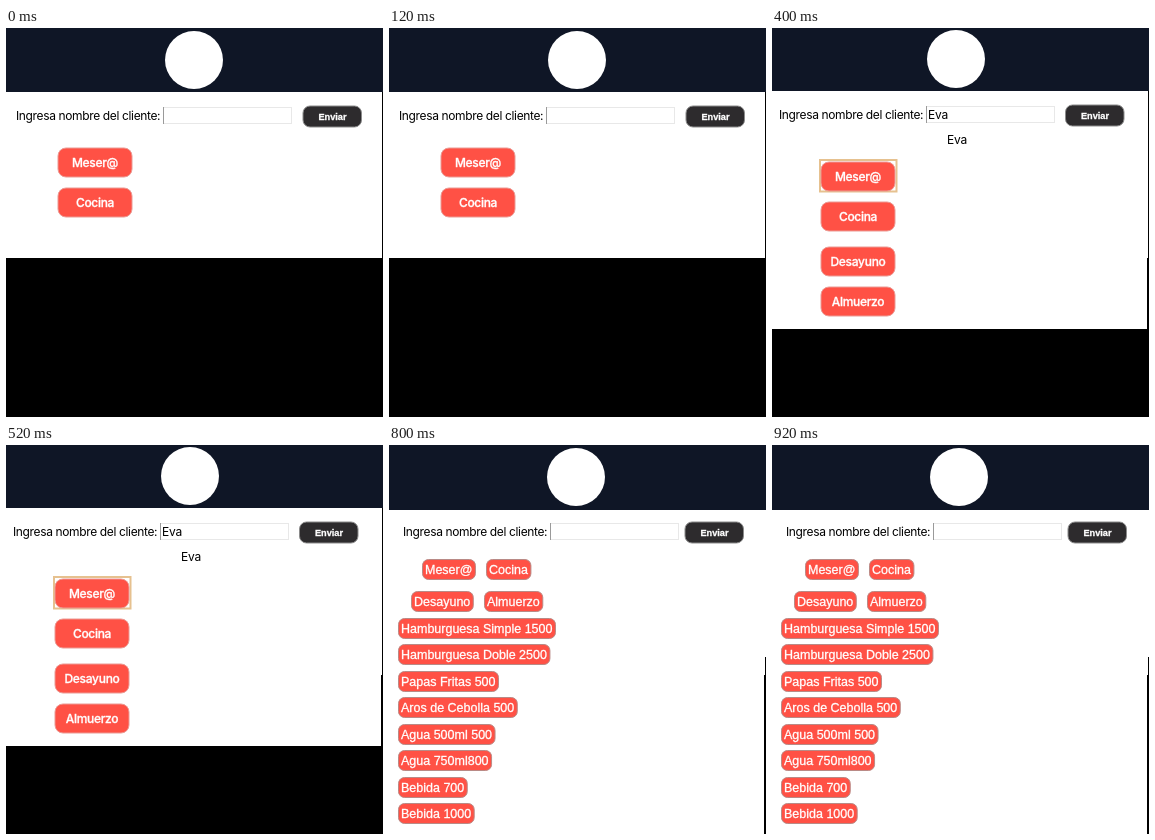
An HTML page with a canvas that plays this animation: 377 by 389 pixels, repeating every 1000 ms.

```html
<!DOCTYPE html>
<html lang="es">
<head>
<meta charset="utf-8">
<title>Pedidos</title>
<style>
html, body { margin: 0; width: 100%; height: 100%; overflow: hidden; background: #000; }
canvas { display: block; }
</style>
</head>
<body>
<canvas id="stage" width="377" height="389"></canvas>
<script>
const ctx = document.getElementById('stage').getContext('2d');
const SANS = 'Inter, sans-serif';
const ARIAL = '"Liberation Sans", Arial, sans-serif';
const RED = '#ff5145';
const CLIENT = 'Eva';
const STEP = 200;

function rect(x, y, w, h, color) {
  ctx.fillStyle = color;
  ctx.fillRect(x, y, w, h);
}

function text(str, x, y, font, color, align = 'left', spacing = 0) {
  ctx.font = font;
  ctx.fillStyle = color;
  ctx.textAlign = align;
  ctx.letterSpacing = spacing + 'px';
  ctx.fillText(str, x, y);
  // Light text on colour is rendered slightly heavier.
  if (color === '#fff') {
    ctx.strokeStyle = color;
    ctx.lineWidth = 0.3;
    ctx.strokeText(str, x, y);
  }
  ctx.letterSpacing = '0px';
}

function pill(x, y, w, h, r, fill, line) {
  ctx.beginPath();
  ctx.roundRect(x + 0.5, y + 0.5, w - 1, h - 1, r);
  ctx.fillStyle = fill;
  ctx.fill();
  ctx.strokeStyle = line;
  ctx.lineWidth = 1;
  ctx.stroke();
}

function ring(x, y, w, h, color, width) {
  ctx.strokeStyle = color;
  ctx.lineWidth = width;
  ctx.strokeRect(x + width / 2, y + width / 2, w - width, h - width);
}

function bigButton(label, x, y) {
  pill(x, y, 75, 30, 8, RED, '#eb9a94');
  text(label, x + 37.5, y + 19.5, '500 12px ' + SANS, '#fff', 'center', -0.3);
}

function smallButton(label, x, y) {
  ctx.font = '12.5px ' + ARIAL;
  pill(x, y, ctx.measureText(label).width + 6.5, 21, 6, RED, '#b98a86');
  text(label, x + 3, y + 14.5, '12.5px ' + ARIAL, '#fff');
}

function header(bottom, logoX, logoY) {
  rect(0, 0, 377, bottom, '#0f1626');
  ctx.fillStyle = '#fff';
  ctx.beginPath();
  ctx.arc(logoX, logoY, 29, 0, Math.PI * 2);
  ctx.fill();
}

function form(x, y, sendX, value) {
  text('Ingresa nombre del cliente:', x, y, '12px ' + SANS, '#000', 'left', -0.36);
  const left = x + 147, top = y - 13;
  ring(left, top, 129, 17, '#e8e8e8', 1);
  rect(left, top, 1, 17, '#9a9a9a');
  if (value) text(value, left + 2, y, '12px ' + SANS, '#000', 'left', -0.2);
  pill(sendX, y - 14.5, 59.5, 22, 7, '#2d2b2d', '#8b8b8b');
  text('Enviar', sendX + 30, y, 'bold 9.2px ' + ARIAL, '#fff', 'center');
}

function clientName(x, y) {
  text(CLIENT, x, y, '12px ' + SANS, '#000', 'center', -0.2);
}

function roles(x, y) {
  bigButton('Meser@', x, y);
  bigButton('Cocina', x, y + 40);
}

function meals(x, y) {
  bigButton('Desayuno', x, y);
  bigButton('Almuerzo', x, y + 40);
}

function compactMenu(x, y) {
  smallButton('Meser@', x + 11, y);
  smallButton('Cocina', x + 75, y);
  smallButton('Desayuno', x, y + 32);
  smallButton('Almuerzo', x + 73, y + 32);
}

const dishes = [
  'Hamburguesa Simple 1500', 'Hamburguesa Doble 2500', 'Papas Fritas 500',
  'Aros de Cebolla 500', 'Agua 500ml 500', 'Agua 750ml800',
  'Bebida 700', 'Bebida 1000'
];

// The page grows in height; its right edge is slightly stepped.
function page(height, fullTop) {
  rect(0, 0, 377, 389, '#000');
  rect(0, 0, 375, height, '#fff');
  rect(375, 0, 1, 230, '#fff');
  if (fullTop) rect(376, 0, 1, 212, '#fff');
}

const screens = [
  () => {
    page(230);
    header(64, 188, 32);
    form(10, 92, 296.5, '');
    roles(51.5, 119.5);
  },
  () => {
    page(248);
    header(64, 186, 32);
    ring(293, 75, 64, 26.5, '#f3bd83', 2);
    form(9, 92, 295, CLIENT);
    clientName(187, 117);
    roles(50.5, 134.5);
  },
  () => {
    page(301);
    header(63, 184, 31);
    form(7, 91, 293, CLIENT);
    clientName(185, 116);
    ring(47, 131, 78.5, 33.5, '#e6c18f', 2);
    roles(48.5, 133.5);
    meals(48.5, 218.5);
  },
  () => {
    page(301, true);
    header(64, 189, 32);
    form(17, 90, 298.5, '');
    ring(34, 111, 58, 26, '#ecdcc6', 1);
    compactMenu(25, 113);
    meals(48.5, 218.5);
  },
  () => {
    page(389, true);
    header(65, 187, 32);
    form(14, 91, 295.5, '');
    compactMenu(22, 114);
    dishes.forEach((dish, i) => smallButton(dish, 9, Math.round(172.6 + i * 26.5)));
  }
];

let start = null;
function tick(now) {
  if (start === null) start = now;
  screens[Math.floor((now - start) / STEP) % screens.length]();
  requestAnimationFrame(tick);
}
screens[0]();
requestAnimationFrame(tick);
</script>
</body>
</html>
```
